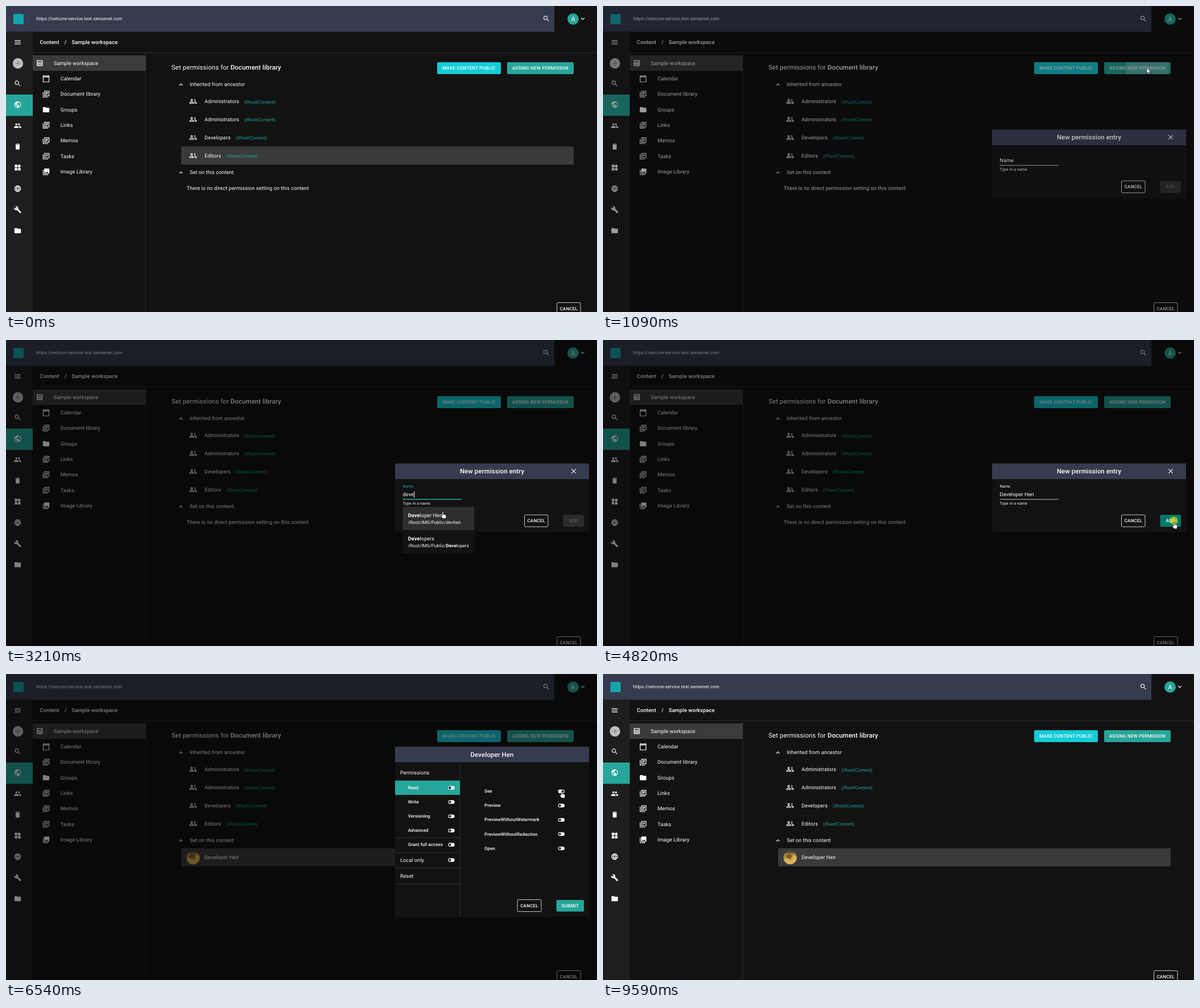
An HTML page that plays this animation: 1039 px wide and 539 px high, repeating every 9.69 s.

```html
<!DOCTYPE html>
<html lang="en">
<head>
<meta charset="utf-8">
<title>Set permissions</title>
<style>
html, body { margin: 0; width: 100%; height: 100%; overflow: hidden; background: #121212; }
svg { display: block; }
text { font-family: Roboto, sans-serif; letter-spacing: .0094em; text-rendering: geometricPrecision; white-space: pre; }
.path { font-family: "Liberation Sans", Arial, sans-serif; letter-spacing: 0; }
.btn { letter-spacing: .0286em; }
</style>
</head>
<body>
<svg id="stage" width="1039" height="539" viewBox="0 0 1039 539"></svg>
<script>
const LOOP = 9690;
const TEAL = '#26a69a', BAR = '#363b4f', BG = '#121212', LINE = '#2c2c2c', ROW = '#3a3a3a';
const PERSON = 'Developer Hen', LOGIN = 'devhen';

// Icons on a 24 unit grid: filled shapes and stroked shapes
const FILLED = {
  search: 'M15.500 14h-.8l-.3-.3A6.500 6.500 0 1 0 13.700 14.400l.3.3v.8l5 5L20.500 19zM9.500 14a4.500 4.500 0 1 1 .01 0z',
  globe: 'M12 2a10 10 0 1 0 .01 0zM4.200 10.200L9 15v1q0 2 2 2v2Q4 18.600 4 12zM13 7q2 0 2-2.400Q20 6.500 20 12q0 3-2.100 5.400Q17.500 16 16 16h-1v-3q0-1-1-1H8v-2h2q1 0 1-1V7z',
  people: 'M16 5a3 3 0 1 0 .01 0zM8 5a3 3 0 1 0 .01 0zM8 13q-7 .5-7 3.500V19h14v-2.500q0-3-7-3.500zM16 13l-1 .1q2 1.300 2 3.400V19h6v-2.500q0-3-7-3.500z',
  trash: 'M6 19q0 2 2 2h8q2 0 2-2V7H6zM19 4h-3.500l-1-1h-5l-1 1H5v2h14z',
  widgets: 'M13 13v8h8v-8zM3 21h8v-8H3zM3 3v8h8V3zM16.700 1.700L11 7.300l5.700 5.700 5.600-5.700z',
  wrench: 'M22.700 19l-9.100-9.100A6.700 6.700 0 0 0 4.700 1.700L9 6 6 9 1.600 4.700a6.700 6.700 0 0 0 8.200 8.900l9.100 9.100q.7.600 1.400 0l2.300-2.300q.7-.7.1-1.400z',
  folder: 'M10 4H4q-2 0-2 2v12q0 2 2 2h16q2 0 2-2V8q0-2-2-2h-8z',
  photos: 'M22 16V4q0-2-2-2H8q-2 0-2 2v12q0 2 2 2h12q2 0 2-2zM11 12l2 2.700L16 11l4 5H8zM2 6v14q0 2 2 2h14v-2H4V6z'
};
const STROKED = {
  menu: 'M3 7h18M3 12h18M3 17h18',
  web: 'M12 3a9 9 0 1 0 .01 0zM12 3q-8 9 0 18q8-9 0-18zM4 9h16M4 15h16',
  inbox: 'M4 4h16v16H4zM4 9h5q3 5 6 0h5M4 13h16M4 16h5q3 5 6 0h5',
  calendar: 'M3 4h18v18H3zM3 7h18M6 1v3M18 1v3',
  books: 'M3 6v15h15M7 3h14v14H7zM10 7h8M10 10h8M10 13h4',
  group: 'M7.500 5.800a2.700 2.700 0 1 0 .01 0zM1.800 18.200v-2q5.700-4.500 11.400 0v2zM15.500 5.800a2.700 2.700 0 0 1 0 5.400M15.500 14q4-.3 6.700 2.200v2h-6',
  down: 'M7 9l5 5 5-5',
  up: 'M7 15l5-5 5 5',
  close: 'M5 5l14 14M19 5L5 19'
};

const rect = (x, y, w, h, fill, extra = '') =>
  `<rect x="${x}" y="${y}" width="${w}" height="${h}" fill="${fill}" ${extra}/>`;
const circle = (x, y, r, fill, extra = '') => `<circle cx="${x}" cy="${y}" r="${r}" fill="${fill}" ${extra}/>`;
const group = (id, body, extra = '') => `<g id="${id}" ${extra}>${body}</g>`;
const text = (x, y, s, size = 9.12, weight = 400, fill = '#fff', extra = '') =>
  `<text x="${x}" y="${y}" font-size="${size}" font-weight="${weight}" fill="${fill}" ${extra}>${s}</text>`;
const mid = 'text-anchor="middle"';
const bold = s => `<tspan font-weight="700">${s}</tspan>`;

function icon(name, cx, cy, size = 13.7) {
  const paint = FILLED[name] ? 'fill="#fff" fill-rule="evenodd"' : 'fill="none" stroke="#fff" stroke-width="2"';
  const k = size / 24;
  return `<path d="${FILLED[name] || STROKED[name]}" ${paint} transform="translate(${cx - size / 2} ${cy - size / 2}) scale(${k})"/>`;
}
function button(x, y, w, h, label, fill, color = '#fff', extra = '') {
  const box = fill ? rect(x, y, w, h, fill, `rx="2" ${extra}`)
    : rect(x + .5, y + .5, w - 1, h - 1, 'none', 'rx="2" stroke="#c8c8c8"');
  return box + text(x + w / 2, y + h / 2 + 2.8, label, 8, 500, color, `class="btn" ${mid}`);
}
const toggle = (x, y, id = '') => rect(x - 5.7, y - 3.2, 11.4, 6.4, '#f4f4f4', 'rx="3.2"') +
  circle(x - 2.6, y, 2.1, '#222', id && `id="${id}"`);

function sidebar() {
  const names = ['globe', 'people', 'trash', 'widgets', 'web', 'wrench', 'folder'];
  return rect(0, 45, 47, 494, '#1e1e1e') + rect(0, 156, 47, 37.5, TEAL) +
    icon('menu', 20.5, 64, 14) + circle(21, 101, 9.2, '#bdbdbd') +
    '<path d="M17 101h8M21 97v8" stroke="#777" stroke-width="1.1"/>' +
    icon('search', 20.5, 136.5) + names.map((n, i) => icon(n, 20.5, 173.7 + i * 37)).join('');
}
function tree() {
  const items = [['calendar', 'Calendar'], ['books', 'Document library'], ['folder', 'Groups'],
    ['books', 'Links'], ['books', 'Memos'], ['books', 'Tasks'], ['photos', 'Image Library']];
  return rect(47, 87, 199, 27.3, '#3b3b3b') + icon('inbox', 59.3, 100.7) + text(84, 103.7, 'Sample workspace') +
    items.map(([n, s], i) => icon(n, 70.5, 128 + i * 27.33) + text(95.7, 131 + i * 27.33, s)).join('');
}
function page() {
  const members = [['Administrators', 419], ['Administrators', 419], ['Developers', 404], ['Editors', 387]];
  return rect(0, 0, 1039, 539, BG) + rect(0, 0, 964, 45.5, BAR) + sidebar() +
    rect(13, 14, 18, 18, '#17a3ae') +
    text(53, 25.3, 'https://netcore-service.test.sensenet.com', 8, 400) +
    icon('search', 950, 22.5) + circle(997, 23, 10, TEAL) + text(997, 26.9, 'A', 11.4, 400, '#fff', mid) +
    icon('down', 1014, 22.7) +
    text(59.6, 66.8, 'Content', 9.4, 500) + text(102.7, 66.8, '/', 9.4, 500) +
    text(115.4, 66.8, 'Sample workspace', 9.4, 500) +
    rect(47, 82, 992, 1, LINE) + rect(245, 83, 1, 456, LINE) + tree() +
    text(291, 111.5, 'Set permissions for <tspan font-weight="500">Document library</tspan>', 11.4) +
    button(758, 99, 112, 21, 'MAKE CONTENT PUBLIC', '#15ccd8') +
    button(881, 99, 117, 21, 'ASSING NEW PERMISSON', TEAL) +
    '<clipPath id="btnClip"><rect x="881" y="99" width="117" height="21" rx="2"/></clipPath>' +
    `<g clip-path="url(#btnClip)">${circle(957, 109, 0, '#fff', 'id="ripple"')}</g>` +
    icon('up', 307.5, 138.3) + text(323, 141.3, 'Inherited from ancestor') +
    rect(308, 247.5, 690, 32, ROW, 'id="editorsRow"') +
    members.map(([s, x], i) => {
      const y = 167.8 + i * 31.85;
      return icon('group', 329, y) + text(349, y + 3.2, s) +
        text(x, y + 3.7, '(/Root/Content)', 8, 400, TEAL, 'class="path"');
    }).join('') +
    icon('up', 307.5, 293.2) + text(323, 296.3, 'Set on this content') +
    group('empty', text(317.6, 323.5, 'There is no direct permission setting on this content')) +
    group('personRow', rect(308, 307, 690, 31.7, ROW) + portrait() + text(349, 325.8, PERSON)) +
    button(968, 522, 42.5, 21.5, 'CANCEL');
}
function portrait() {
  return '<clipPath id="face"><circle cx="329" cy="323.6" r="11.6"/></clipPath><g clip-path="url(#face)">' +
    rect(317, 311, 24, 25, '#b58a35') + rect(317, 311, 24, 5, '#5f5136') +
    '<path d="M317 336v-9l7-3 6 5 5-10 6 3v14z" fill="#d8b35c"/>' +
    '<ellipse cx="327" cy="321" rx="5" ry="4" fill="#7d5a28"/></g>';
}
function entryDialog() {
  return rect(684, 217.5, 341, 121.5, BG) + rect(684, 217.5, 341, 27.5, BAR) +
    text(854.5, 235, 'New permission entry', 11.4, 500, '#fff', mid) + icon('close', 998, 231.2, 13) +
    text(697.6, 275.3, 'Name', 9.12, 400, '#fff', 'id="label"') +
    text(697.6, 275.3, '', 9.12, 400, '#fff', 'id="value"') +
    rect(0, 266.5, 1, 11, '#fff', 'id="caret"') +
    rect(697.6, 280.3, 103.4, .9, '#cfcfcf') + rect(0, 279.8, 0, 1.4, TEAL, 'id="focusLine"') +
    text(697.6, 290.4, 'Type in a name', 6.84, 400, '#fff', 'style="letter-spacing:.024em"') +
    button(911, 307.5, 42.5, 22, 'CANCEL') +
    group('addOff', button(979.5, 308, 36.5, 21, 'ADD', '#2c2c2c', '#5c5c5c')) +
    group('addOn', button(979.5, 308, 36.5, 21, 'ADD', TEAL, '#fff', 'id="addBox"'));
}
function options() {
  const row = (y, name, path) => text(706.7, y, name) + text(706.7, y + 12.3, path, 7.98);
  return rect(697.6, 294, 125.7, 82, BG) + rect(697.6, 294, 125.7, 41, '#2e2e2e') +
    row(311.5, bold('Deve') + PERSON.slice(4), '/Root/IMS/Public/' + LOGIN) +
    row(352.5, bold('Deve') + 'lopers', `/Root/IMS/Public/${bold('Deve')}lopers`);
}
function rightsDialog() {
  const left = ['Read', 'Write', 'Versioning', 'Advanced', 'Grant full access'];
  const right = ['See', 'Preview', 'PreviewWithoutWatermark', 'PreviewWithoutRedaction', 'Open'];
  return rect(684, 128, 341, 300, BG) + rect(684, 128, 341, 27.5, BAR) +
    text(854.5, 145.7, PERSON, 11.4, 500, '#fff', mid) +
    rect(797.5, 160, 1, 268, '#303030') + text(693, 176.6, 'Permissions') +
    rect(684, 187.7, 114, 25.2, TEAL) +
    [288, 314, 341.5, 369.5].map(y => rect(684, y, 114, 1, '#303030')).join('') +
    left.map((s, i) => {
      const y = 200.4 + i * 25.1;
      return text(706.7, y + 2.5, s, 7.98, 500) + toggle(783, y);
    }).join('') +
    text(693, 331, 'Local only') + toggle(783, 327.8) + text(693, 358.8, 'Reset') +
    right.map((s, i) => {
      const y = 206.7 + i * 25.1;
      return text(841, y + 2.5, s, 7.98, 500) + toggle(976.3, y, i ? '' : 'seeKnob');
    }).join('') +
    button(898.5, 397, 43, 22, 'CANCEL') + button(967.5, 398, 48.5, 20.5, 'SUBMIT', TEAL);
}
const pointers =
  circle(0, 0, 7, '#f2ea12', 'id="dot"') +
  '<path id="arrow" d="M0 0v9.600l2.200-2 1.500 3.300 1.700-.8-1.500-3.200h3z" fill="#fff" stroke="#111" stroke-width=".6"/>' +
  '<path id="hand" d="M-1 1q1-2 2 0v4l4 1q1 .3.800 2L5 12.500h-5L-3.500 8q-.5-1.500 1-1l1.500 1z" fill="#fff" stroke="#111" stroke-width=".7"/>';

document.getElementById('stage').innerHTML = page() +
  rect(0, 0, 1039, 539, '#000', 'id="shade"') +
  group('entry', entryDialog()) + group('options', options()) +
  group('rights', rightsDialog()) + pointers;

const el = {};
document.querySelectorAll('[id]').forEach(n => el[n.id] = n);
const set = (id, attrs) => { for (const k in attrs) el[id].setAttribute(k, attrs[k]); };
const show = (id, on) => set(id, { opacity: +on });

// time, x, y, shape used until the next stop
const STOPS = [
  [170, 680, 268, 'arrow'], [700, 956, 109, 'hand'], [960, 956, 109, 'arrow'], [1190, 956, 109, 'arrow'],
  [1900, 766, 271, 'arrow'], [2510, 766, 271, ''], [2950, 766, 271, 'hand'], [3210, 768, 302, 'hand'],
  [3530, 766, 312, 'hand'], [3830, 766, 312, 'arrow'], [4640, 1004, 320, 'hand'], [5100, 1004, 320, 'arrow'],
  [5760, 890, 217, 'arrow'], [6010, 977, 206, 'hand'], [6780, 977, 206, 'arrow'], [7450, 990, 408, 'hand'],
  [7700, 990, 408, 'arrow'], [7870, 942, 438, 'arrow'], [8510, 905, 342, 'arrow'], [8650, 905, 342, 'arrow'],
  [9000, 457, 539, '']
];
const CLICKS = [720, 1990, 3800, 4760, 6170, 7480];

const clamp = p => Math.max(0, Math.min(1, p));
function ramp(t, a, b) {
  const p = clamp((t - a) / (b - a));
  return p * p * (3 - 2 * p);
}
const between = (t, a, b) => t >= a && t < b;

function drawPointer(t) {
  const i = STOPS.findLastIndex(s => s[0] <= t);
  const [t0, x0, y0, shape] = STOPS[Math.max(i, 0)];
  const [t1, x1, y1] = STOPS[i + 1] || [LOOP, x0, y0];
  const p = ramp(t, t0, t1), x = x0 + (x1 - x0) * p, y = y0 + (y1 - y0) * p;
  for (const id of ['arrow', 'hand']) {
    show(id, i >= 0 && id === shape);
    set(id, { transform: `translate(${x} ${y})` });
  }
  const click = CLICKS.findLast(c => c <= t);
  const fade = click === undefined ? 0 : clamp(1 - (t - click) / 360);
  set('dot', { cx: x - .5, cy: y - 2, opacity: .75 * fade });
}

function drawField(t) {
  const up = ramp(t, 2000, 2190), focused = between(t, 2000, 3810);
  set('label', { 'font-size': 9.12 - 2.28 * up, y: 275.3 - 14.9 * up, fill: focused ? TEAL : '#fff' });
  const line = focused ? 103.4 * up : 0;
  set('focusLine', { x: 749.3 - line / 2, width: line });
  const keys = [2510, 2600, 2690, 2790].filter(k => t >= k).length;
  el.value.textContent = t >= 3810 ? PERSON : 'deve'.slice(0, keys);
  const base = keys ? 2790 : 2000;
  show('caret', focused && (between(t, 2510, 2790) || Math.floor((t - base) / 530) % 2 === 0));
  set('caret', { x: 697.8 + el.value.getComputedTextLength() });
  show('options', between(t, 2790, 3810));
  show('addOff', t < 3810);
  show('addOn', t >= 3810);
  set('addBox', { fill: t > 4600 ? '#07796c' : TEAL });
}

function draw(t) {
  const shade = ramp(t, 930, 1165), clear = 1 - ramp(t, 7720, 7865);
  show('editorsRow', t < 240);
  set('ripple', { r: 38 * ramp(t, 720, 1080), opacity: .22 * (1 - ramp(t, 1100, 1400)) });
  const saved = t >= 5150;
  show('empty', !saved);
  show('personRow', saved);
  set('shade', { opacity: .5 * shade * clear });
  set('entry', { opacity: shade * (1 - ramp(t, 4900, 5095)) });
  set('rights', { opacity: ramp(t, 5170, 5395) * clear });
  set('seeKnob', { cx: 973.7 + 5.2 * ramp(t, 6190, 6340) });
  drawField(t);
  drawPointer(t);
}

const start = performance.now();
function tick() {
  draw((performance.now() - start) % LOOP);
  requestAnimationFrame(tick);
}
tick();
</script>
</body>
</html>
```
